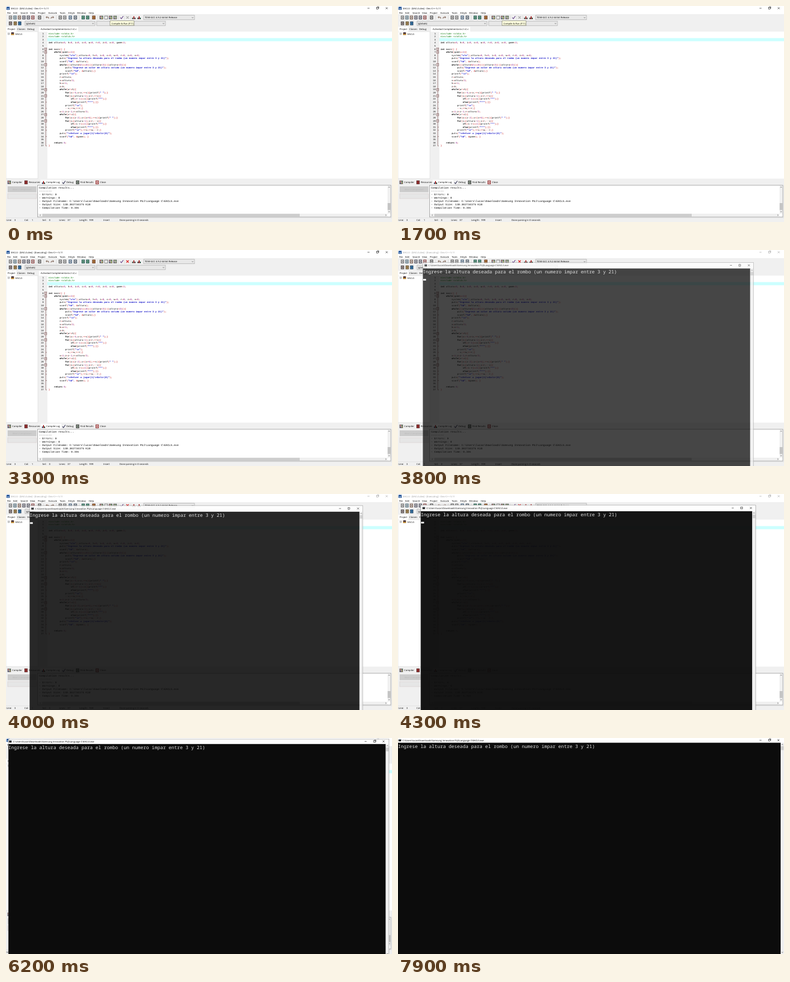
Write an HTML page with a canvas that moves like this. It is 690 by 388 pixels and loops after 8 s.

```html
<!DOCTYPE html>
<html lang="es">
<head>
<meta charset="utf-8">
<title>Rombo</title>
<style>
html, body { margin: 0; height: 100%; overflow: hidden; background: #fff; }
canvas { position: absolute; left: 0; top: 0; width: 690px; height: 388px; }
</style>
</head>
<body>
<canvas id="ide"></canvas>
<canvas id="console"></canvas>
<script>
const W = 690, H = 388, LOOP = 8000;
const RUN = 2900, OPEN = 3403, HOVER = 5400, MAXIMIZE = 5750;
const dpr = window.devicePixelRatio || 1;
const [ideLayer, consoleLayer] = ['ide', 'console'].map(id => {
  const canvas = document.getElementById(id);
  canvas.width = W * dpr;
  canvas.height = H * dpr;
  return canvas.getContext('2d');
});
let ctx = ideLayer;

const UI = '"Open Sans", "Noto Sans", sans-serif';
const COURIER = '"Liberation Mono", monospace';
const TERMINAL = '"Noto Sans Mono", "DejaVu Sans Mono", monospace';
const PATH = String.raw`C:\Users\lucas\Downloads\Samsung Innovation PUJ\Language C\EACLS.exe`;
const PROMPT = 'Ingrese la altura deseada para el rombo (un numero impar entre 3 y 21)';

const CODE = String.raw`#include <stdio.h>
#include <stdlib.h>

int altura=0, h=0, i=0, c=0, w=0, r=0, z=0, x=0, game=1;

int main() {
    while(game==1){
        system("cls");altura=0, h=0, i=0, c=0, w=0, r=0, z=0, x=0;
        puts("Ingrese la altura deseada para el rombo (un numero impar entre 3 y 21)");
        scanf("%d", &altura);
        while(((altura%2)==0)||(altura<3)||(altura>21)){
            puts("Ingrese un valor de altura valido (un numero impar entre 3 y 21)");
            scanf("%d", &altura);}
        printf("\n");
        r=altura;
        x=altura/2;
        h=x+1;
        z=h;
        while(w!=h){
            for(c=-5;c<x;++c){printf(" ");}
            for(i=(altura-1);i<r;++i){
                if((r-1)==i){printf("*");}
                else{printf("**");}}
            printf("\n");
            --x;++w;++r;}
        x=1;z=z-1;r=altura/2;
        while(x!=z){
            for(c=(z-2);c<(x+5);++c){printf(" ");}
            for(i=(altura-1);i>r;--i){
                if((i-r)==1){printf("*");}
                else{printf("**");}}
            printf("\n");++x;++w;--r;}
        puts("\nVolver a jugar(1)\nSalir(0)");
        scanf("%d", &game); }

    return 0;
}`.split('\n');

const LOG = ['Compilation results...', '--------', '- Errors: 0', '- Warnings: 0',
  '- Output Filename: ' + PATH, '- Output Size: 130.302734375 KiB', '- Compilation Time: 0.30s'];

const lerp = (a, b, p) => a + (b - a) * p;
const clamp = v => Math.max(0, Math.min(1, v));

function rect(x, y, w, h, color) {
  ctx.fillStyle = color;
  ctx.fillRect(x, y, w, h);
}

function frame(x, y, w, h, color, width = 0.5) {
  ctx.strokeStyle = color;
  ctx.lineWidth = width;
  ctx.strokeRect(x, y, w, h);
}

function line(points, color, width = 0.6) {
  ctx.beginPath();
  for (let i = 0; i < points.length; i += 2) ctx.lineTo(points[i], points[i + 1]);
  ctx.strokeStyle = color;
  ctx.lineWidth = width;
  ctx.stroke();
}

// Text is laid out ten times larger so that small sizes keep exact advances.
function text(str, x, baseline, { size = 4.2, font = UI, color = '#000', bold = false, align = 'left' } = {}) {
  ctx.save();
  ctx.translate(x, baseline);
  ctx.scale(0.1, 0.1);
  ctx.font = `${bold ? 'bold ' : ''}${size * 10}px ${font}`;
  ctx.textRendering = 'geometricPrecision';
  ctx.textAlign = align;
  ctx.fillStyle = color;
  ctx.fillText(str, 0, 0);
  ctx.restore();
}

function chevron(x, y, dx, dy, color = '#555') {
  line([x - dx - dy * 1.4, y - dy - dx * 1.4, x, y, x - dx + dy * 1.4, y - dy + dx * 1.4], color, 0.7);
}

function cross(x, y, r, color, width) {
  line([x - r, y - r, x + r, y + r], color, width);
  line([x - r, y + r, x + r, y - r], color, width);
}

function check(x, y, color) {
  line([x - 2.6, y, x - 0.8, y + 2.2, x + 2.7, y - 2.6], color, 1.1);
}

function windowButtons([min, max, close], y, color, restored) {
  line([min - 1.8, y, min + 1.8, y], color);
  frame(max - 1.6, y - 1.6, 3.2, 3.2, color, 0.6);
  if (restored) line([max - 0.6, y - 2.5, max + 2.5, y - 2.5, max + 2.5, y + 0.6], color, 0.5);
  cross(close, y, 1.7, color, 0.6);
}

function icon(x, y, color, fill = '#ccc') {
  rect(x - 2.3, y - 2.8, 4.6, 5.6, fill);
  frame(x - 2.3, y - 2.8, 4.6, 5.6, color, 1);
  line([x - 1.2, y, x + 1.4, y], color, 1.1);
}

function gridIcon(x, y, colors) {
  colors.forEach((c, i) => rect(x - 2.6 + (i % 2) * 2.8, y - 2.6 + (i >> 1) * 2.8, 2.4, 2.4, c));
  frame(x - 2.8, y - 2.8, 5.6, 5.6, '#555', 0.7);
}

function chartIcon(x, y, colors) {
  colors.forEach((c, i) => rect(x - 3 + i * 2, y + 0.4 - i % 2 * 2.6, 2, 2.4 + i % 2 * 2.6, c));
}

function combo(x, y, w, label) {
  rect(x, y, w, 8, '#e8e8e8');
  frame(x, y, w, 8, '#aaa', 0.7);
  text(label, x + 2, y + 5.5);
  chevron(x + w - 3.5, y + 4.7, 0, 1);
}

function drawToolbars(running) {
  rect(0, 15.5, W, 0.5, '#ddd');
  const y = 20.7;
  const pages = [[8, '#666'], [16, '#467'], [24, '#754'], [32, '#445'], [40, '#445'], [48, '#833'], [60, '#444'],
    [97, '#555'], [105, '#666'], [115, '#357'], [124, '#345']];
  for (const [x, color] of pages) icon(x, y, color);
  for (const [x, dir] of [[74, 1], [83, -1]]) {
    line([x + 2.5 * dir, y + 2, x + 2 * dir, y - 0.5, x - 2.2 * dir, y - 0.5], '#643', 0.9);
    line([x - 0.6 * dir, y - 2.2, x - 2.4 * dir, y - 0.5, x - 0.6 * dir, y + 1.2], '#643', 0.9);
  }
  icon(138, y, '#255', '#7a8');
  icon(146, y, '#255', '#7a8');
  icon(157, y, '#632', '#b84');
  gridIcon(170.5, y, ['#a66', '#686', '#678', '#a95']);
  gridIcon(179, y, ['#eee', '#ddd', '#fff', '#eee']);
  gridIcon(187, y, ['#a66', '#585', '#568', '#aa5']);
  gridIcon(195, y, ['#886', '#686', '#778', '#997']);
  check(207, y, '#648');
  cross(217.3, y, 2.2, running ? '#d22' : '#aaa', 1.2);
  chartIcon(228.5, y, ['#243', '#a33', '#333']);
  chartIcon(238, y, ['#333', '#a33', '#243']);
  for (const x of [54, 67, 90, 131, 152, 164, 201, 212, 223]) line([x, 17, x, 25], '#ccc', 0.5);
  combo(246, 16.7, 91, 'TDM-GCC 4.9.2 64-bit Release');
  icon(8, 31.2, '#444', '#a99');
  icon(16.5, 31.2, '#542', '#b96');
  icon(24.5, 31.2, '#135', '#48b');
  combo(34, 27.2, 125, '(globals)');
  combo(162, 27.2, 123, '');
  if (!running) {
    rect(186, 26.7, 43, 8.2, '#ffffe1');
    frame(186, 26.7, 43, 8.2, '#776', 0.7);
    text('Compile & Run (F11)', 188.5, 32.5);
  }
}

function drawCodeLine(source, x, baseline) {
  const size = 4.13, pitch = size * 0.6;
  const put = (str, at, color, bold) =>
    text(str, x + at * pitch, baseline, { size, font: COURIER, color, bold });
  if (source[0] === '#') return put(source, 0, '#070');
  for (const { 0: token, index } of source.matchAll(/"[^"]*"|\w+|[^\w\s"]+/g)) {
    if (token[0] === '"') put(token, index, '#1414c8', true);
    else if (/^\d/.test(token)) put(token, index, '#707');
    else if (/^(int|while|for|if|else|return)$/.test(token)) put(token, index, '#000', true);
    else put(token, index, /\w/.test(token) ? '#000' : '#b00');
  }
}

function drawEditor() {
  const rowY = n => 49.3 + (n - 1) * 5.61;
  rect(0, 46, 57, 264, '#fff');
  rect(59, 46, 631, 264, '#fff');
  rect(59, 46, 15, 264, '#f0f0f0');
  frame(0, 46, 57, 264, '#ccc');
  rect(74, 57.6, 616, 5.7, '#cff');

  rect(0.5, 37.3, 18, 9, '#fff');
  text('Project', 3, 42.7);
  text('Classes', 20, 43.3);
  text('Debug', 38, 43.3);
  rect(59, 37.3, 70, 9, '#fff');
  text('Actividad Complementaria 2 LC.c', 62, 42.7);
  frame(3.5, 48.5, 3, 3, '#888');
  line([4.2, 50, 5.8, 50], '#222', 0.5);
  rect(9, 47.8, 5.5, 4.4, '#b83');
  rect(9.6, 47.3, 4.3, 2.7, '#434');
  text('EACLS', 17, 51.6);

  line([71, rowY(6), 71, rowY(37), 73, rowY(37)], '#744', 0.6);
  for (const n of [13, 23, 25, 31, 32, 34]) line([71, rowY(n), 73, rowY(n)], '#744', 0.6);
  for (const n of [6, 7, 11, 19, 21, 27, 29]) {
    rect(69, rowY(n) - 1.9, 3.8, 3.8, '#fff');
    frame(69, rowY(n) - 1.9, 3.8, 3.8, '#633', 0.6);
    line([69.9, rowY(n), 71.9, rowY(n)], '#411', 0.6);
  }
  CODE.forEach((source, i) => {
    const baseline = rowY(i + 1) + 1.2;
    text(String(i + 1), 67.5, baseline, { size: 4.13, font: COURIER, align: 'right' });
    drawCodeLine(source, 76, baseline);
  });
}

function drawLog() {
  const y = 316.8;
  rect(62, 312.3, 37, 9, '#fff');
  gridIcon(5.8, y, ['#a55', '#575', '#557', '#985']);
  icon(35.8, y, '#522', '#a33');
  chartIcon(67, y, ['#357', '#a33', '#243']);
  check(103.5, y, '#335');
  icon(128, y, '#333', '#9a9');
  icon(163, y, '#822', '#ecc');
  const tabs = { Compiler: 11, Resources: 41, 'Compile Log': 72, Debug: 108, 'Find Results': 133, Close: 168 };
  for (const [label, x] of Object.entries(tabs)) text(label, x, 318.4);

  rect(3, 324, 51.5, 10.5, '#ccc');
  text('Abort Compilation', 28.7, 330.7, { size: 4, color: '#b8b8b8', align: 'center' });
  rect(3, 337, 51.5, 9, '#e6e6e6');
  frame(3, 337, 51.5, 9, '#d0c4c4');

  rect(56.5, 322, 631.5, 57, '#fff');
  LOG.forEach((str, i) => text(str, 59, 327.8 + i * 6, { size: 4.78, font: COURIER }));
  rect(57, 373, 625, 5.5, '#f0f0f0');
  rect(65, 373.3, 460, 4.9, '#cdcdcd');
  chevron(60.8, 375.7, -1, 0);
  chevron(679.5, 375.7, 1, 0);
  rect(682, 322.5, 5.5, 50.5, '#f0f0f0');
  rect(682.2, 354, 5, 12.5, '#c4c4c4');
  chevron(684.8, 325, 0, -1);
  chevron(684.8, 370, 0, 1);
  frame(56.5, 322, 631.5, 57, '#888', 0.7);

  rect(0, 380, W, 0.5, '#d4d4d4');
  const status = [[1, 'Line:'], [15, '3'], [33, 'Col:'], [46, '1'], [65, 'Sel:'], [77, '0'], [95, 'Lines:'],
    [110, '37'], [131, 'Length:'], [149, '999'], [174, 'Insert'], [203, 'Done parsing in 0 seconds']];
  for (const [x, label] of status) text(label, x, 386);
}

function drawIde(t) {
  const running = t >= RUN;
  const ink = t < OPEN ? '#000' : '#999';
  rect(0, 0, W, H, '#f0f0f0');
  rect(0, 0, W, 15.5, '#fff');
  rect(1, 1.5, 5.5, 5.5, '#1d4f94');
  rect(2.2, 4.5, 3, 1.6, '#cde');
  text(`EACLS - [EACLS.dev] -${running ? ' [Executing] -' : ''} Dev-C++ 5.11`, 9, 5.6, { color: ink });
  windowButtons([648, 664, 680.5], 4, ink, true);
  const menu = { File: 2, Edit: 13, Search: 26, View: 43, Project: 57, Execute: 76, Tools: 96, AStyle: 111, Window: 127, Help: 148 };
  for (const [label, x] of Object.entries(menu)) text(label, x, 13.7);
  drawToolbars(running);
  drawEditor();
  drawLog();
}

function drawConsole(t) {
  const hidden = t < OPEN ? 1 : t < 4400 ? Math.exp((OPEN - t) / 280) : 0;
  const p = t < MAXIMIZE + 50 ? 0 : t > 6800 ? 1 : 1 - Math.exp((MAXIMIZE - t) / 200);
  const x = lerp(40, 0, p), y = lerp(19.5, 0, p);
  const w = lerp(600, W, p), h = lerp(392, H, p);
  const bar = lerp(11, 8.5, p), top = y + bar, right = x + w;
  const mid = y + lerp(5.2, 4, p), inset = lerp(5, 3, p);

  // The whole window fades as one layer.
  ctx.canvas.style.opacity = 1 - hidden;
  ctx.clearRect(0, 0, W, H);
  ctx.save();
  ctx.translate(340, 215);
  ctx.scale(1 - 0.061 * hidden, 1 - 0.061 * hidden);
  ctx.translate(-340, -215);

  rect(x, y, w, bar, '#fff');
  rect(x, top, w - 6, h - bar, '#0c0c0c');
  rect(right - 6, top, 6, h - bar, '#f0f0f0');
  if (p < 1) frame(x, y, w, h, '#777');

  if (t >= HOVER && p === 0) {
    const shade = 0.1 + 0.1 * clamp((t - HOVER) / 100);
    rect(right - 33, y + 0.3, 16.5, bar - 0.3, `rgba(0,0,0,${shade})`);
  }
  rect(x + inset - 2, mid - 2, 4.6, 4, '#222');
  rect(x + inset - 2, mid - 2, 4.6, 1, '#9ab');
  text(PATH, x + inset + 5, mid + 1.5, { size: 4.17 });
  windowButtons([right - 41 - p, right - 25 - p, right - 8.5 - 1.5 * p], mid, '#000', p > 0.5);

  chevron(right - 3, top + 2.7, 0, -1);
  rect(right - 5.6, top + 6.2, 5, lerp(6.3, 7, p), '#cdcdcd');
  chevron(right - 3, y + h - 2.5, 0, 1);

  text(PROMPT, x, top + 9, { size: 8.38, font: TERMINAL, color: '#dedede' });
  if (p === 0) rect(x + 0.5, top + 19, 5.3, 3, '#f2f2f2');
  ctx.restore();
}

function draw(now) {
  const t = now % LOOP;
  for (const [layer, paint] of [[ideLayer, drawIde], [consoleLayer, drawConsole]]) {
    ctx = layer;
    ctx.setTransform(dpr, 0, 0, dpr, 0, 0);
    paint(t);
  }
}

const start = performance.now();
function tick() {
  draw(performance.now() - start);
  requestAnimationFrame(tick);
}
tick();
</script>
</body>
</html>
```
